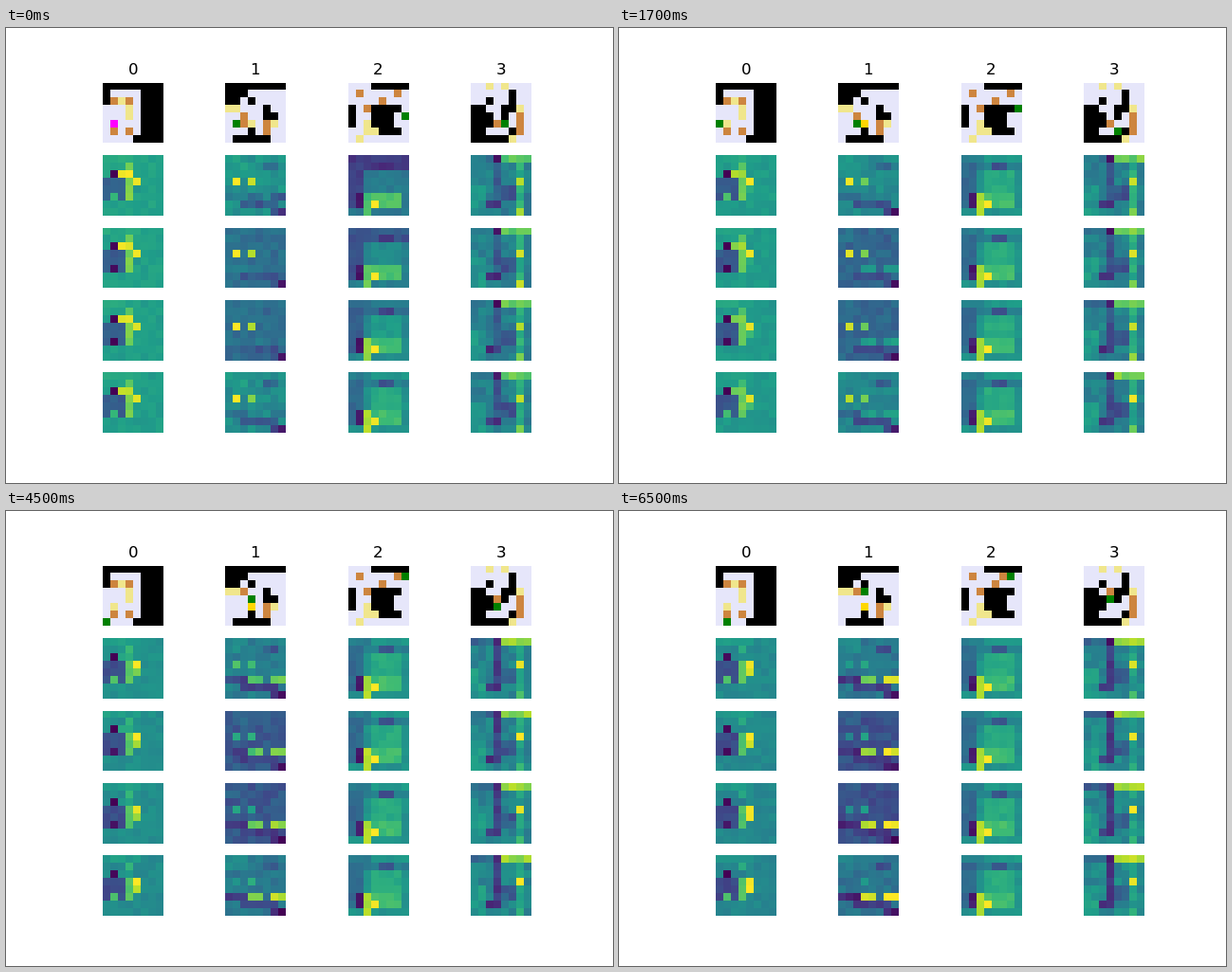
An HTML page that plays this animation: 640 by 480 pixels, repeating every 8000 ms.

```html
<!DOCTYPE html>
<html lang="en">
<head>
<meta charset="utf-8">
<title>Block pushing and activations</title>
<style>
html, body { margin: 0; width: 100%; height: 100%; overflow: hidden; background: #fff; }
svg { display: block; width: 640px; height: 480px; }
text { font: 16.667px "DejaVu Sans", sans-serif; }
</style>
</head>
<body>
<svg id="stage" viewBox="0 0 640 480"></svg>
<script>
const firstTurn = 500, turnTime = 2000, loop = 8000;
const size = 8, rows = 5, cols = 4, lastTick = 19;
const pitchX = 129.4, pitchY = 76.47, left0 = 102.05, top0 = 57.6;
const ink = { floor: '#e6e6fa', wall: '#000', box: '#cd853f', goal: '#f0e68c',
              done: '#ffd700', agent: '#008000', onGoal: '#ff00ff' };

// Block puzzles: walls are [x, y, width, height]; the agent pushes boxes.
const puzzles = [
  { walls: [[0,0,8,1], [0,1,1,2], [5,1,3,7], [4,7,1,1]],
    goals: [[2,2], [3,3], [3,4], [1,5]],
    boxes: [[1,2], [3,2], [1,6], [3,6]], agent: [1,5], moves: 'LDDR' },
  { walls: [[0,0,8,1], [0,1,3,1], [0,2,2,1], [3,2,1,1], [5,3,1,2], [6,4,1,1], [3,6,1,1], [1,7,5,1]],
    goals: [[0,3], [1,3], [3,5], [6,5]],
    boxes: [[2,4], [2,5], [5,5], [5,6]], agent: [1,5], moves: 'RURU' },
  { walls: [[3,0,5,1], [0,3,1,3], [3,3,4,1], [3,4,3,2], [4,6,3,1]],
    goals: [[2,5], [2,6], [3,6], [1,7]],
    boxes: [[1,1], [6,1], [4,2], [2,3]], agent: [7,4], moves: 'UUUL' },
  { walls: [[5,1,1,2], [2,2,1,1], [0,3,2,4], [2,4,1,2], [4,3,2,1], [4,4,1,1], [5,6,1,1], [0,7,5,1]],
    goals: [[2,0], [4,0], [6,3], [5,7]],
    boxes: [[3,5], [6,4], [6,5], [6,6]], agent: [4,5], moves: 'DLUU' }
];
const steps = { L: [-1, 0], R: [1, 0], U: [0, -1], D: [0, 1] };
const same = (a, b) => a[0] === b[0] && a[1] === b[1];
const shift = (p, d) => [p[0] + d[0], p[1] + d[1]];
const inside = ([a, b, w, h], x, y) => x >= a && x < a + w && y >= b && y < b + h;
const mix = (a, b, f) => a + (b - a) * f;

function puzzleAt(p, turn) {
  let agent = p.agent, boxes = p.boxes;
  for (const m of p.moves.slice(0, turn)) {
    const d = steps[m];
    agent = shift(agent, d);
    boxes = boxes.map(b => same(b, agent) ? shift(b, d) : b);
  }
  return { agent, boxes };
}

function puzzleColor(p, state, x, y) {
  const here = q => same(q, [x, y]), goal = p.goals.some(here);
  if (here(state.agent)) return goal ? ink.onGoal : ink.agent;
  if (state.boxes.some(here)) return goal ? ink.done : ink.box;
  if (goal) return ink.goal;
  return p.walls.some(w => inside(w, x, y)) ? ink.wall : ink.floor;
}

// Each heat map drifts from one level to another over `span` ticks, with random
// grain. Regions are { at: [x, y, w, h], from, to }, painted in order;
// `sway` lets a level swing once every four ticks.
const region = (x, y, w, h, from, to = from, sway = 0) => ({ at: [x, y, w, h], from, to, sway });
const maps = [
  { span: lastTick, grain: .03, regions: [
    region(0,0,8,8, .57,.46),
    region(0,0,5,1, .6,.53),
    region(3,1,1,4, .76,.6),
    region(0,3,3,3, .3,.22),
    region(3,3,1,3, .8,.72),
    region(1,2,1,1, 0),
    region(2,2,2,1, 1,.4),
    region(4,3,1,1, .97,1),
    region(4,4,1,1, .5,1),
    region(1,5,1,1, .34,.38, .34)] },
  { span: lastTick, grain: .05, regions: [
    region(0,0,8,8, .44,.31, .07),
    region(0,0,3,2, .47,.36, .08),
    region(5,1,2,1, .35,.24),
    region(0,5,3,1, .42,.1),
    region(2,6,5,1, .28,.17),
    region(6,7,1,1, .25,.12),
    region(7,7,1,1, .1,0),
    region(1,3,1,1, 1.2,.4),
    region(3,3,1,1, .9,.5),
    region(3,5,2,1, .35,.9),
    region(6,5,2,1, .3,1.05)] },
  { span: 3, grain: .03, regions: [
    region(0,0,8,8, .4,.51),
    region(0,0,8,2, .16,.43),
    region(3,0,5,1, .18,.53),
    region(0,1,2,4, .2,.34),
    region(3,2,4,3, .42,.61),
    region(4,1,2,1, .1,.25),
    region(3,5,4,2, .72,.69),
    region(0,5,1,2, .2,.34),
    region(1,5,1,2, .04,.07),
    region(2,5,1,3, .7,.88),
    region(3,6,1,1, 1)] },
  { span: lastTick, grain: .06, regions: [
    region(0,0,8,8, .43,.47),
    region(0,0,3,1, .4,.3),
    region(0,4,2,4, .52,.54),
    region(3,1,1,5, .3,.14),
    region(4,4,2,2, .25,.3),
    region(2,6,2,1, .15),
    region(6,0,1,8, .63,.54),
    region(3,0,1,1, .05,.1),
    region(4,0,4,1, .75,.87),
    region(6,3,1,1, .93,1),
    region(6,7,1,1, .88,.65)] }
];

function noise(...seeds) {
  const n = Math.sin(seeds.reduce((sum, s, i) => sum + s * (12.99 + i * 65.24), 1)) * 43758.55;
  return (n - Math.floor(n)) * 2 - 1;
}

function level(col, x, y, tick) {
  const { span, grain, regions } = maps[col];
  const hit = regions.filter(r => inside(r.at, x, y)).pop();
  const swing = Math.SQRT2 * Math.cos((tick + .5) * Math.PI / 2);
  const v = mix(hit.from, hit.to, Math.min(1, tick / span)) + hit.sway * swing;
  return v + grain * noise(x, y, col, tick);
}

const viridis = [[68,1,84], [72,40,120], [62,73,137], [49,104,142], [38,130,142],
                 [31,158,137], [53,183,121], [110,206,88], [181,222,43], [253,231,37]];
function heat(v) {
  const p = Math.min(1, Math.max(0, v)) * 9, i = Math.min(8, Math.floor(p));
  return `rgb(${viridis[i].map((c, k) => Math.round(mix(c, viridis[i + 1][k], p - i)))})`;
}

const stage = document.getElementById('stage');
function add(tag, attrs) {
  const node = document.createElementNS('http://www.w3.org/2000/svg', tag);
  for (const k in attrs) node.setAttribute(k, attrs[k]);
  return stage.appendChild(node);
}

const cells = [];
for (let col = 0; col < cols; col++) {
  const left = left0 + col * pitchX;
  add('text', { x: Math.round(left + 26.5), y: 49 }).textContent = col;
  for (let row = 0; row < rows; row++) {
    const top = top0 + row * pitchY, x0 = Math.round(left);
    for (let i = 0; i < size * size; i++) {
      const x = i % size, y = Math.floor(i / size);
      const y0 = Math.floor(top) + y * size, start = Math.max(y0, Math.round(top));
      const node = add('rect', { x: x0 + x * size, y: start, width: size,
        height: y0 + size - start, 'shape-rendering': 'crispEdges' });
      cells.push({ node, col, row, x, y });
    }
  }
}

let shown = -1;
function draw(ms) {
  const turn = Math.max(0, Math.floor((ms % loop - firstTurn) / turnTime) + 1);
  if (turn === shown) return;
  shown = turn;
  const states = puzzles.map(p => puzzleAt(p, turn));
  for (const { node, col, row, x, y } of cells)
    node.setAttribute('fill', row === 0
      ? puzzleColor(puzzles[col], states[col], x, y)
      : heat(level(col, x, y, turn * (rows - 1) + row - 1)));
}

const begin = performance.now();
function tick() {
  draw(performance.now() - begin);
  requestAnimationFrame(tick);
}
tick();
</script>
</body>
</html>
```
